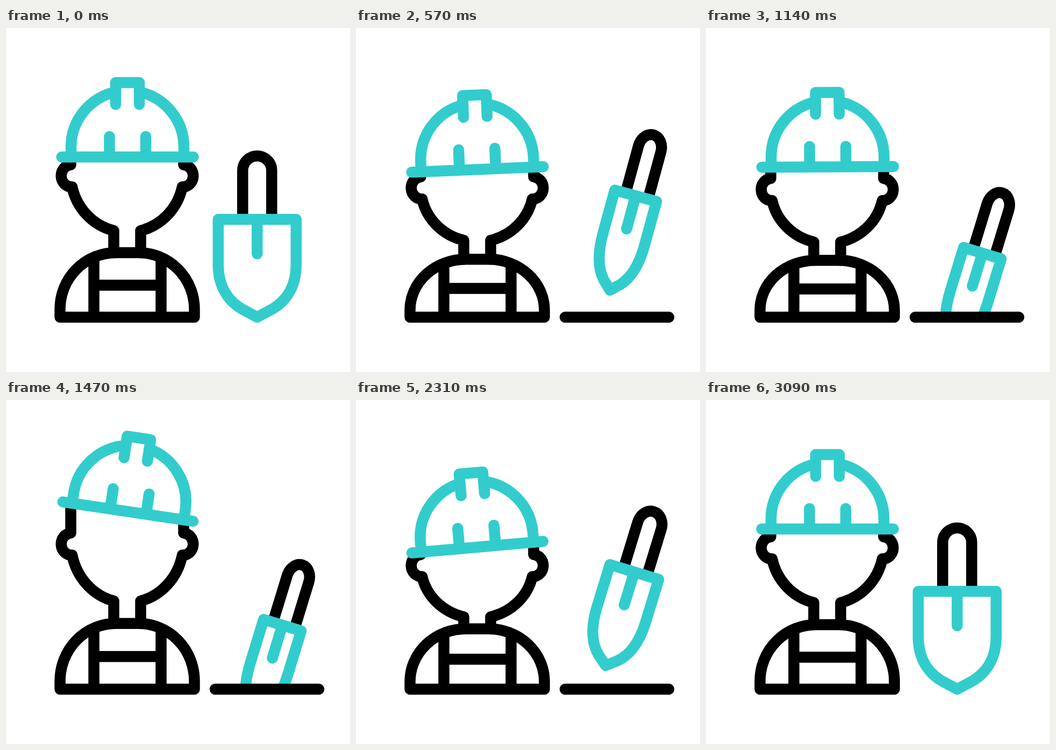
An HTML page that plays this animation: 640x640 px, repeating every 3120 ms.

```html
<!DOCTYPE html>
<html lang="en">
<head>
<meta charset="utf-8">
<title>Builder with spade</title>
<style>
  html, body { margin: 0; width: 100%; height: 100%; overflow: hidden; background: #fff; }
  svg { display: block; width: 100vw; height: 100vh; }
  path { fill: none; stroke: #000; stroke-width: 20.5; stroke-linecap: round; stroke-linejoin: round; }
  .teal path { stroke: #33cccc; }
  #handle { stroke-linecap: butt; }
</style>
</head>
<body>
<svg viewBox="0 0 640 640">
  <clipPath id="above"><rect id="sky" width="640" height="640"/></clipPath>
  <path id="head"/>
  <path id="body"/>
  <g id="helmet" class="teal">
    <path d="M-105 0V-18A105 105 0 0 1 -22 -121M22 -121A105 105 0 0 1 105 -18V0"/>
    <path d="M-22 -98V-138.500H22V-98M-33.500 -38V0M34 -38V0M-122.500 0H122.500"/>
  </g>
  <g clip-path="url(#above)">
    <g id="spade">
      <path id="handle"/>
      <g class="teal"><path id="blade"/></g>
    </g>
  </g>
  <path id="ground"/>
</svg>
<script>
const LOOP = 3120, STEP = 30, FLOOR = 538, MID = 225.5;
const el = id => document.getElementById(id);
const draw = (id, d) => el(id).setAttribute("d", d);

// Eased 0 to 1 between two times, and rises that fall back to 0.
function ramp(t, a, b) {
  const p = Math.min(1, Math.max(0, (t - a) / (b - a)));
  return (1 - Math.cos(Math.PI * p)) / 2;
}
const plateau = (t, a, b, c, d) => ramp(t, a, b) - ramp(t, c, d);
const hump = (t, a, b, c) => plateau(t, a, b, b, c);

function headSide(side, top, ear, chin, shoulder) {
  const x = d => MID + side * d;
  const sweep = side > 0 ? 1 : 0;
  const ry = (chin - ear - 21) / 0.754;
  return `M${x(105)} ${top}V${ear - 20.5}` +
    `A19 20.5 0 0 ${sweep} ${x(102.5)} ${ear + 20.5}` +
    `A105 ${ry} 0 0 ${sweep} ${x(25)} ${chin}V${shoulder}`;
}

function drawPerson(t) {
  const ready = hump(t, 180, 900, 1555);
  const stretch = hump(t, 900, 1555, 2260);
  const recoil = hump(t, 1555, 2260, 2706);
  const crouch = ready + 0.85 * recoil;

  const brim = 240 + 41 * crouch - 35.6 * stretch;
  const tilt = 9 * stretch - 4.2 * ready - 5.2 * recoil;
  const ear = 275 + 40 * crouch - 9 * stretch;
  const chin = 377 + 32 * crouch - 4.5 * stretch;
  const shoulder = 418 + 21.5 * ready - 3.3 * stretch + 8 * recoil;

  const slope = Math.tan(tilt * Math.PI / 180) * 105;
  draw("head", [-1, 1].map(side =>
    headSide(side, brim + side * slope, ear, chin, shoulder)).join(""));

  const k = (FLOOR - shoulder) / 120;
  const y = h => FLOOR - h * k;
  draw("body", `M100.5 538V${y(15)}A104 ${105 * k} 0 0 1 204.500 ${shoulder}H246.500` +
    `A104 ${105 * k} 0 0 1 350.500 ${y(15)}V538Z` +
    `M163.500 ${y(111)}V538M288.500 ${y(111)}V538M163.500 ${y(59.5)}H288.500`);
  el("helmet").setAttribute("transform", `translate(${226 + stretch} ${brim}) rotate(${tilt})`);
}

function drawSpade(t) {
  const swing = hump(t, 0, 720, 1110);
  const pull = hump(t, 1870, 2430, 3090);
  const dug = plateau(t, 720, 1110, 1870, 2430);
  const lean = 17 * plateau(t, 0, 720, 2420, 3090);
  const turn = plateau(t, 0, 720, 1850, 3090);

  const x = 467.3 + 5.7 * swing - 2.3 * pull - 6.3 * dug;
  const y = FLOOR - 56 * (swing + pull) + 55 * dug;
  const w = 72.5 - 36 * turn, h = 27 - 6 * turn, s = w / 72.5, shift = 2.5 * turn;
  draw("handle", `M${shift - h} -182V-273A${h} 27 0 0 1 ${shift + h} -273V-182`);
  draw("blade", `M${-w} -182H${w}V-98C${w} -55 ${52 * s} -29 ${28 * s} -15L0 0` +
    `L${-28 * s} -15C${-52 * s} -29 ${-w} -55 ${-w} -98ZM0 -182V-118`);
  el("spade").setAttribute("transform", `translate(${x} ${y}) rotate(${lean})`);
  el("sky").setAttribute("height", dug > 0 ? FLOOR : 640);
}

function drawGround(t) {
  const left = 582 - 193 * ramp(t, 150, 540);
  const right = 582 - 193 * ramp(t, 2354, 2700);
  draw("ground", t > 150 && t < 2700 ? `M${left} ${FLOOR}H${right}` : "");
}

const began = performance.now();
function frame(now) {
  const t = Math.floor(Math.max(0, now - began) % LOOP / STEP) * STEP;
  drawPerson(t);
  drawSpade(t);
  drawGround(t);
  requestAnimationFrame(frame);
}
frame(began);
</script>
</body>
</html>
```
